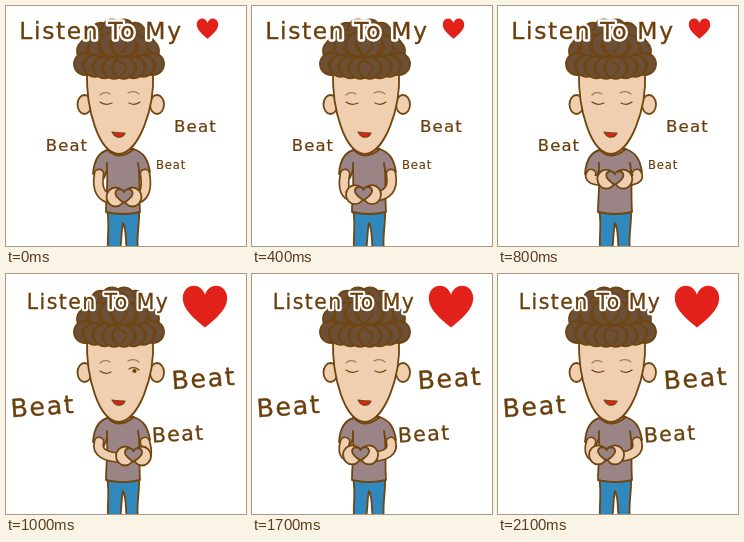
Write an HTML page that moves like this. It is 240 by 240 pixels and loops after 2.3 s.

```html
<!DOCTYPE html>
<html lang="en">
<head>
<meta charset="utf-8">
<title>Listen To My Heart</title>
<style>
  html, body { margin: 0; height: 100%; overflow: hidden; background: #fff; }
  svg { display: block; width: 100vw; height: 100vh; }
  .line { stroke: #70450f; stroke-width: 1.8; stroke-linecap: round; stroke-linejoin: round; }
  .thin { fill: none; stroke-width: 1.2; }
  .none { fill: none; }
  .skin { fill: #efcfb0; }
  .shirt { fill: #9a8486; }
  .pants { fill: #3188bd; }
  .hair { fill: #6b4f36; }
  .red { fill: #e3211b; }
  .arm { fill: none; stroke-linecap: round; stroke: #70450f; stroke-width: 11; }
  .arm.in { stroke: #efcfb0; stroke-width: 7.6; }
  text { font: 20px "DejaVu Sans", sans-serif; letter-spacing: .07em; text-anchor: middle; stroke-linejoin: round; }
  .halo { fill: #fff; stroke: #fff; stroke-width: 4.5; }
  .ink { fill: #6b3f0c; stroke: #6b3f0c; stroke-width: .3; }

  /* Key poses of everything that pulses. */
  .pulse { transform: var(--rest); }
  .beat .pulse { transform: var(--beat); }
  .echo .pulse { transform: var(--echo, var(--rest)); }
  #love {
    --rest: translate(201.5px, 22.5px) scale(11.3);
    --beat: translate(199px, 32.5px) scale(23.4);
  }
  #title {
    --rest: translate(95px, 33px) scale(1.17);
    --beat: translate(92px, 35px) scale(1.02);
    --echo: translate(98.5px, 34px) scale(1.24);
  }
  #left {
    --rest: translate(61px, 145px) scale(.82);
    --beat: translate(37.5px, 141px) rotate(-4deg) scale(1.25);
    --echo: translate(31.5px, 151px) scale(.67);
  }
  #right {
    --rest: translate(189.5px, 126px) scale(.83);
    --beat: translate(198.5px, 113px) rotate(-4deg) scale(1.25);
    --echo: translate(191px, 127px) rotate(4deg) scale(.82);
  }
  #near {
    --rest: translate(165px, 163px) scale(.58);
    --beat: translate(172.5px, 167px) rotate(-3deg) scale(1.02);
    --echo: translate(166px, 169px) rotate(4deg) scale(.7);
  }
  #wink, .wink #asleep { display: none; }
  .wink #wink { display: inline; }
</style>
</head>
<body>
<svg id="stage" viewBox="0 0 240 240">
  <defs>
    <path id="heart" d="M0 .9C-.5 .5-.95 .1-.95-.35C-.95-.95-.2-1.1 0-.5C.2-1.1 .95-.95 .95-.35C.95 .1 .5 .5 0 .9Z" vector-effect="non-scaling-stroke"/>
  </defs>

  <g class="line">
    <path class="pants" d="M101 203C104 218 101 230 102 244H114C116 234 115 225 117 217C121 225 119 234 121 244H132C130 230 134 218 133 203Z"/>
    <path class="shirt" d="M102 144C93 146 88 154 87 168L98 172L101 164C102 180 100 192 100 206Q117 210 134 206C133 192 134 180 133 164L135 170L144 166C142 154 138 146 127 143Z"/>
    <path class="none" d="M101 164L101 157M133 164L132 157"/>
    <path class="skin" d="M101 143Q112 156 128 143Z"/>
  </g>

  <g id="arms"></g>
  <g id="hands" class="line">
    <ellipse class="skin" cx="-8.5" cy="1" rx="9" ry="9.5"/>
    <ellipse class="skin" cx="8.5" cy="1" rx="9" ry="9.5"/>
    <use href="#heart" class="shirt" transform="scale(9 7.5)"/>
  </g>

  <g class="line">
    <ellipse class="skin" cx="78.5" cy="98.5" rx="7" ry="9.5"/>
    <ellipse class="skin" cx="151" cy="98.5" rx="7" ry="9.5"/>
    <path class="skin" d="M81 66C80 102 92 147 113 148C132 147 149 104 147 66Z"/>
    <path class="thin" d="M94 89Q98 85 104 88M122 87Q128 84 133 88" opacity=".6"/>
    <path id="asleep" class="thin" d="M94 96Q99 100 106 97M123 97Q129 100 134 96"/>
    <g id="wink">
      <path class="thin" d="M94 97Q99 101 105 98M123 95Q128 92 133 96"/>
      <circle cx="128.5" cy="97" r="1.2"/>
    </g>
    <path class="red" d="M106 126Q112 127 119 127Q117 132 111 131Q108 130 106 126Z" stroke-width="1.2"/>
  </g>

  <g id="hair" class="line hair"></g>
  <use id="love" href="#heart" class="red pulse"/>
  <g id="words"></g>
</svg>

<script>
const $ = id => document.getElementById(id);
function add(parent, tag, attrs, text = "") {
  const el = document.createElementNS("http://www.w3.org/2000/svg", tag);
  for (const key in attrs) el.setAttribute(key, attrs[key]);
  el.textContent = text;
  return parent.appendChild(el);
}

// A round lock with a crescent inside that curls away from the parting.
function lock(x, y, r) {
  const s = x < 112 ? -1 : 1;
  add($("hair"), "circle", { cx: x, cy: y, r });
  add($("hair"), "path", { class: "none", d: `M${x - s * r * .5} ${y - r * .6}q${s * r * 1.3} ${r * .4} ${s * r * .3} ${r * 1.3}` });
}

// Locks from both ends towards the middle, so that the inner ones lie on top.
function row(pairs, place) {
  for (let i = 0; i < pairs; i++)
    for (const side of [-1, 1]) lock(...place(side * (1 - i / (pairs - .5))));
}
row(4, u => [112 + 27 * Math.sin(u * 1.6), 39 - 16 * Math.cos(u * 1.6), 10]);
add($("hair"), "ellipse", { cx: 112, cy: 42, rx: 31, ry: 20, stroke: "none" });
row(3, u => [112 + 29 * u, 45 - 7 * (1 - u * u), 12]);
row(4, u => [113 + 34 * u, 62 - 4 * u * u, 11]);

const arms = ["arm", "arm in"].flatMap(cls =>
  [-1, 1].map(side => ({ side, el: add($("arms"), "path", { class: cls }) })));

function write(id, word) {
  const g = add($("words"), "g", { id, class: "pulse" });
  for (const cls of ["halo", "ink"]) add(g, "text", { class: cls }, word);
}
write("title", "Listen To My");
["left", "right", "near"].forEach(id => write(id, "Beat"));

// Ten steps per loop; the middle one is held longer.
const LOOP = 2300, STEP = 200, MIDDLE = 5, HOLD = 300;
let shown;

function pose(k) {
  const name = k % 2 ? "beat" : k > MIDDLE ? "echo" : "rest";
  $("stage").setAttribute("class", k === MIDDLE ? name + " wink" : name);

  // The hands speed up round a circle, then swing back and settle at the left.
  const n = k > MIDDLE ? Math.max(2 * MIDDLE - k, 3) : k;
  const angle = 1.5 * Math.PI * (n / MIDDLE) ** 2;
  const x = 118 - 9.5 * Math.sin(angle), y = 181 + 9 * Math.cos(angle);
  $("hands").setAttribute("transform", `translate(${x} ${y})`);
  for (const { side, el } of arms)
    el.setAttribute("d", `M${116 + side * 23} 168Q${116 + side * 27} ${y + 2} ${x + side * 10} ${y + 3}`);
}

function tick() {
  const t = performance.now() % LOOP;
  const k = Math.floor(t < MIDDLE * STEP ? t / STEP : Math.max(MIDDLE, (t - HOLD) / STEP));
  if (k !== shown) pose(shown = k);
  requestAnimationFrame(tick);
}
tick();
</script>
</body>
</html>
```
